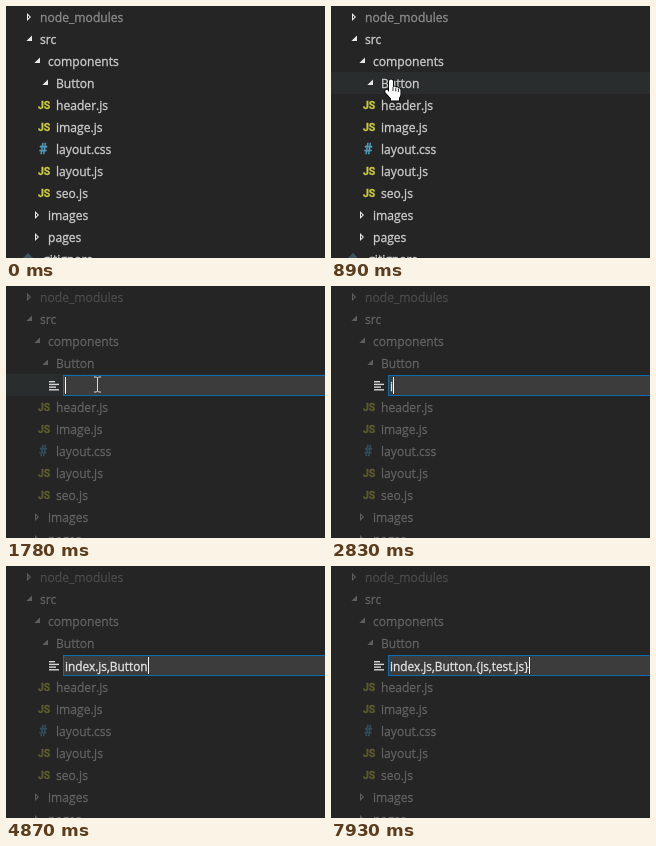
An HTML page with a canvas that plays this animation: 319 by 252 pixels, repeating every 8000 ms.

```html
<!DOCTYPE html>
<html lang="en">
<head>
<meta charset="utf-8">
<title>File tree</title>
<style>
html, body { margin: 0; width: 319px; height: 252px; overflow: hidden; background: #252526; }
canvas { display: block; }
</style>
</head>
<body>
<canvas id="stage" width="319" height="252"></canvas>
<script>
const ctx = document.getElementById('stage').getContext('2d');
const LOOP = 8000, ROW = 22, MENU_OPEN = 1170, MENU_CLOSE = 1450, EDIT = 1780;
const UI = '12.1px "Open Sans", sans-serif';
const INPUT = '11.85px "Open Sans", sans-serif';
const YELLOW = '#cbcb41';

const tree = [
  ['closed', 'node_modules', 34, '#8c8c8c'],
  ['open', 'src', 34],
  ['open', 'components', 42],
  ['open', 'Button', 50],
  ['js', 'header.js', 50],
  ['js', 'image.js', 50],
  ['css', 'layout.css', 50],
  ['js', 'layout.js', 50],
  ['js', 'seo.js', 50],
  ['closed', 'images', 42],
  ['closed', 'pages', 42],
  ['git', '.gitignore', 34]
];

// label, baseline, shortcut
const menu = [
  ['New File', 99],
  ['New Folder', 124],
  ['Reveal in Trailbox', 149, 'Shift+Alt+R'],
  ['Open in Terminal', 175],
  ['Find in Folder...', 208, 'Shift+Alt+F'],
  ['Cut', 242]
];

const typed = 'index.js,Button.{js,test.js}';
const keyTimes = [
  2750, 2850, 2950, 3060, 3210, 3390, 3520, 3670, 3750,
  4410, 4490, 4640, 4720, 4790, 4870, 5560, 5890, 6170, 6300,
  6630, 6710, 6810, 6960, 7090, 7270, 7550, 7650, 7930
];

// pointer stops: time, x, y
const stops = [
  [330, 200, 250], [850, 60, 74], [990, 60, 74], [1120, 62, 75], [1170, 62, 75],
  [1220, 77, 84], [1270, 77, 84], [1300, 90, 97], [1450, 90, 97],
  [1780, 91, 98], [1850, 91, 98], [1910, 150, 120]
];

const shapes = {
  open: new Path2D('M11 10H5.344L11 4.414V10z'),
  closed: new Path2D('M6 4v8l4-4-4-4zm1 2.414L8.586 8 7 9.586V6.414z'),
  git: new Path2D('M8 2L14 8L8 14L2 8Z'),
  arrow: new Path2D('M0 0V16.5L3.8 13L6.4 19L9 17.9L6.5 12.1H11.7Z'),
  hand: new Path2D('M-2 12V1.5A2 2 0 0 1 2 1.5V7Q4 6 5 7.4Q7 6.6 7.5 8.2Q9.4 7.8 9.5 10V14Q9.5 16.5 8 18V20.5H0V18.5L-5.5 12.5Q-6.5 10.5-5 9.9Q-3.5 9.5-2 12Z'),
  knuckles: new Path2D('M2 7V11M4.8 8V11.5M7.4 8.5V12'),
  beam: new Path2D('M-3.5-7.5H-1L0-6.5L1-7.5H3.5M0-6.5V6.5M-3.5 7.5H-1L0 6.5L1 7.5H3.5')
};

function rect(x, y, w, h, color) {
  ctx.fillStyle = color;
  ctx.fillRect(x, y, w, h);
}

// a hairline stroke gives the strokes their slightly heavier weight
function text(str, x, y, color = '#cccccc', font = UI) {
  ctx.font = font;
  ctx.fillStyle = ctx.strokeStyle = color;
  ctx.lineWidth = 0.3;
  ctx.fillText(str, x, y);
  ctx.strokeText(str, x, y);
}

function fillAt(path, x, y, color) {
  ctx.save();
  ctx.translate(x, y);
  ctx.fillStyle = color;
  ctx.fill(path);
  ctx.restore();
}

function strokeAt(path, x, y, color, width = 1) {
  ctx.save();
  ctx.translate(x, y);
  ctx.strokeStyle = color;
  ctx.lineWidth = width;
  ctx.stroke(path);
  ctx.restore();
}

// x is the left edge of the label, y the top of the row
function icon(kind, x, y) {
  if (kind === 'js') text('JS', x - 18, y + 15, YELLOW, '700 10.5px Roboto, sans-serif');
  else if (kind === 'css') text('#', x - 17, y + 16, '#519aba', '700 14px Roboto, sans-serif');
  else if (kind === 'git') fillAt(shapes.git, x - 20, y + 3, '#41535b');
  else if (kind === 'file') [6, 10, 7, 10].forEach((w, i) => rect(x - 15, y + 7 + i * 2.7, w, 1.4, '#d4d7d6'));
  else fillAt(shapes[kind], x - 19, y + 3, '#e8e8e8');
}

function pointerAt(t) {
  if (t < stops[0][0] || t >= stops[stops.length - 1][0]) return null;
  const i = stops.findIndex(s => s[0] > t);
  const [t0, x0, y0] = stops[i - 1], [t1, x1, y1] = stops[i];
  const p = (t - t0) / (t1 - t0);
  const k = i === 1 ? 1 - (1 - p) ** 2 : p;
  return { x: Math.round(x0 + (x1 - x0) * k), y: Math.round(y0 + (y1 - y0) * k) };
}

function drawTree(editing) {
  ctx.globalAlpha = editing ? 0.3 : 1;
  tree.forEach(([kind, label, x, color], i) => {
    const y = (editing && i > 3 ? i + 1 : i) * ROW;
    icon(kind, x, y);
    text(label, x, y + 16, color);
  });
  ctx.globalAlpha = 1;
}

function drawInput(t) {
  const count = keyTimes.filter(k => k <= t).length;
  const str = typed.slice(0, count);
  icon(str.endsWith('.js') ? 'js' : 'file', 58, 88);
  rect(57, 89, 300, 21, '#0f6cae');
  rect(58, 90, 300, 19, '#3c3c3c');
  text(str, 59, 105, '#e4e4e4', INPUT);
  const lastKey = count ? keyTimes[count - 1] : EDIT;
  if (t - lastKey < 510) rect(59 + Math.round(ctx.measureText(str).width), 91, 1, 17, '#ffffff');
}

function drawMenu(hovered) {
  ctx.save();
  ctx.shadowColor = '#000';
  ctx.shadowBlur = 8;
  ctx.shadowOffsetY = 2;
  rect(59, 75, 300, 220, '#252526');
  ctx.restore();
  if (hovered) rect(60, 83, 259, 22, '#094771');
  rect(70, 186, 249, 1, '#5f5f60');
  rect(70, 219, 249, 1, '#5f5f60');
  menu.forEach(([label, y, keys], i) => {
    text(label, 86, y, hovered && i === 0 ? '#ffffff' : '#cccccc');
    if (keys) text(keys, 289, y);
  });
}

function drawPointer({ x, y }, kind) {
  if (kind === 'beam') {
    strokeAt(shapes.beam, x + 0.5, y + 0.5, '#d8d8d8');
    return;
  }
  strokeAt(shapes[kind], x, y, '#000', 1.6);
  fillAt(shapes[kind], x, y, '#fff');
  if (kind === 'hand') strokeAt(shapes.knuckles, x, y, '#000', 0.8);
}

function draw(t) {
  const menuOpen = t >= MENU_OPEN && t < MENU_CLOSE;
  const editing = t >= EDIT;
  const pointer = pointerAt(t);
  rect(0, 0, 319, 252, '#252526');
  if (pointer && !menuOpen) {
    rect(0, Math.floor(pointer.y / ROW) * ROW, 319, ROW, '#2a2d2e');
  }
  drawTree(editing);
  if (editing) drawInput(t);
  if (menuOpen) drawMenu(pointer.y >= 82);
  if (pointer) drawPointer(pointer, editing ? 'beam' : menuOpen ? 'arrow' : 'hand');
}

function tick() {
  draw(performance.now() % LOOP);
  requestAnimationFrame(tick);
}
tick();
</script>
</body>
</html>
```
